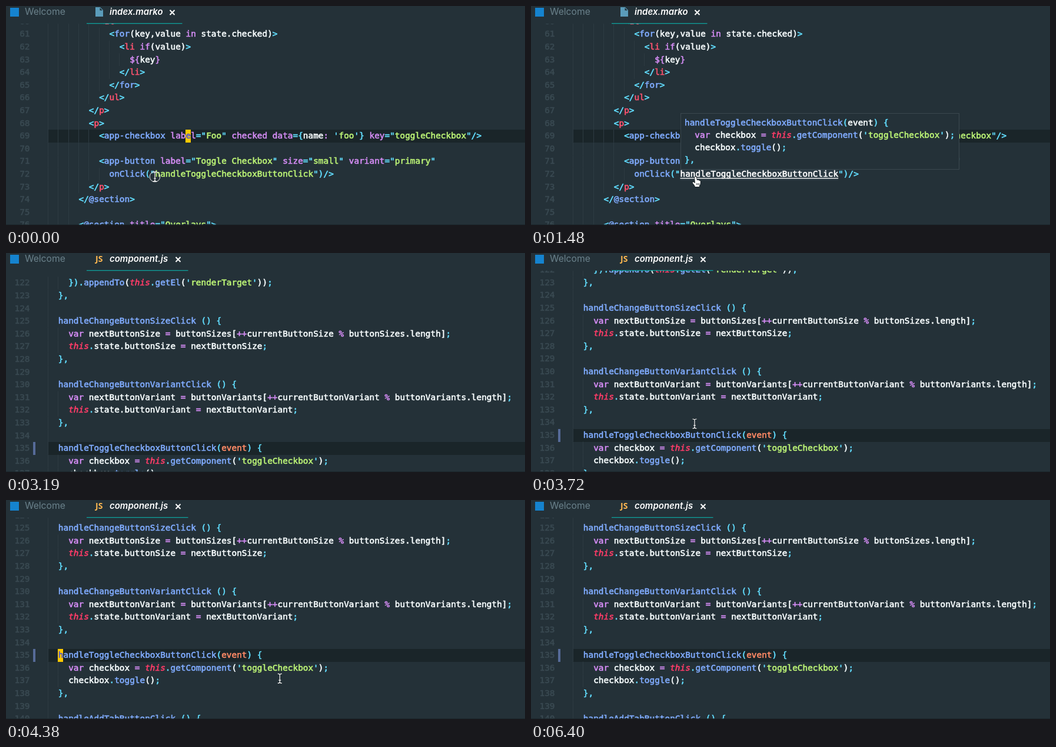
Write an HTML page with a canvas that moves like this. It is 882x372 px and loops after 6500 ms.

```html
<!DOCTYPE html>
<html lang="en">
<head>
<meta charset="utf-8">
<title>Go to definition</title>
<style>
html, body { margin: 0; width: 100%; height: 100%; overflow: hidden; background: #243138; }
canvas { display: block; }
</style>
</head>
<body>
<canvas id="stage" width="882" height="372"></canvas>
<script>
const ctx = document.getElementById('stage').getContext('2d');
const W = 882, H = 372, LOOP = 6500;
const CHAR = 8.667, LINE = 21.6, LEFT = 71.5, TOP = 30, BASE = 15.2;
const MONO = '14.4px "DejaVu Sans Mono", monospace';
const UI = 'Inter, sans-serif';
const BG = '#243138';

// A "~x" mark in a line switches to colour x.
const COLORS = {
  c: '#62deff', b: '#80acff', p: '#d48cf4', g: '#bcf476',
  r: '#ff5370', o: '#ff8a66', w: '#f8feff', t: '#ff3c68'
};

const TEMPLATE = { first: 60, rows: [
  '          ~c<~rul~c>',
  '            ~c<~bfor~w(key,value ~pin ~wstate.checked)~c>',
  '              ~c<~rli ~pif~w(value)~c>',
  '                ~p${~wkey~p}',
  '              ~c</~rli~c>',
  '            ~c</~bfor~c>',
  '          ~c</~rul~c>',
  '        ~c</~rp~c>',
  '        ~c<~rp~c>',
  '          ~c<~bapp-checkbox ~plabel~c="~gFoo~c" ~pchecked data~c={~wname~p: ~c\'~gfoo~c\'} ~pkey~c="~gtoggleCheckbox~c"/>',
  '          ',
  '          ~c<~bapp-button ~plabel~c="~gToggle Checkbox~c" ~psize~c="~gsmall~c" ~pvariant~c="~gprimary~c"',
  '            ~bonClick~c("~ghandleToggleCheckboxButtonClick~c")/>',
  '        ~c</~rp~c>',
  '      ~c</~b@section~c>',
  '      ',
  '      ~c<~b@section ~ptitle~c="~gOverlays~c">'
] };

const cycler = (name, list) => [
  '  ~bhandleChange' + name + 'Click ~c() {',
  `    ~pvar ~wnext${name} ~p= ~w${list}[~p++~wcurrent${name} ~p% ~w${list}.length]~c;`,
  `    ~tthis~c.~wstate.b${name.slice(1)} ~p= ~wnext${name}~c;`,
  '  ~c},',
  '  '
];

const COMPONENT = { first: 122, rows: [
  '    ~c}).~bappendTo~w(~tthis~c.~bgetEl~w(~c\'~grenderTarget~c\'~w))~c;',
  '  ~c},',
  '  ',
  ...cycler('ButtonSize', 'buttonSizes'),
  ...cycler('ButtonVariant', 'buttonVariants'),
  '  ~bhandleToggleCheckboxButtonClick~c(~oevent~c) {',
  '    ~pvar ~wcheckbox ~p= ~tthis~c.~bgetComponent~w(~c\'~gtoggleCheckbox~c\'~w)~c;',
  '    ~wcheckbox~c.~btoggle~w()~c;',
  '  ~c},',
  '  ',
  '  ~bhandleAddTabButtonClick ~c() {',
  '    '
] };

const HOVER = [
  '~bhandleToggleCheckboxButtonClick~c(~wevent~c) {',
  '  ~pvar ~wcheckbox ~p= ~tthis~c.~bgetComponent~w(~c\'~gtoggleCheckbox~c\'~w)~c;',
  '  ~wcheckbox~c.~btoggle~w()~c;',
  '~c},'
];

// Keys are [time, value, value...].
const SCROLL = [[3600, 321], [3720, 299], [4000, 268], [4270, 253]];
const APPROACH = [[0, 253, 290], [700, 273, 290], [1000, 280, 290]];
const WANDER = [
  [4300, 278, 290], [4380, 464, 303], [4580, 730, 332], [4760, 869, 352],
  [4970, 826, 305], [5200, 735, 242], [5420, 640, 290], [5630, 690, 338], [5910, 655, 384]
];

function along(keys, t) {
  if (t <= keys[0][0]) return keys[0].slice(1);
  for (let i = 1; i < keys.length; i++) {
    const a = keys[i - 1], b = keys[i];
    if (t < b[0]) {
      const k = (t - a[0]) / (b[0] - a[0]);
      return a.slice(1).map((v, j) => v + (b[j + 1] - v) * k);
    }
  }
  return keys[keys.length - 1].slice(1);
}

function box(x, y, w, h, color) {
  ctx.fillStyle = color;
  ctx.fillRect(x, y, w, h);
}

function glyphs(text, x, y, color, italic) {
  ctx.font = (italic ? 'italic ' : '') + MONO;
  ctx.fillStyle = ctx.strokeStyle = color;
  ctx.lineWidth = 0.6;
  for (const ch of text) {
    if (ch !== ' ') {
      ctx.fillText(ch, x, y);
      ctx.strokeText(ch, x, y);
    }
    x += CHAR;
  }
}

function code(line, x, y) {
  line.split('~').forEach((part, i) => {
    const key = i ? part[0] : 'w';
    const text = i ? part.slice(1) : part;
    glyphs(text, x, y, COLORS[key], key === 't');
    x += text.length * CHAR;
  });
}

function page(doc, number, top, lit) {
  const yOf = n => top + (n - number) * LINE;
  box(71, Math.round(yOf(lit)), W - 71, 22, '#1a2529');
  doc.rows.forEach((row, i) => {
    const n = doc.first + i, y = yOf(n);
    if (y > H || y + LINE < TOP) return;
    const indent = row.search(/[^ ]|$/);
    for (let c = 0; c < indent; c += 2) {
      box(Math.floor(LEFT + c * CHAR), y, 1, LINE, '#2d3b42');
    }
    const label = String(n), base = Math.round(y + BASE);
    glyphs(label, 40.5 - label.length * CHAR, base, '#394951');
    code(row, LEFT, base);
  });
}

function caret(col, y, ch) {
  const x = LEFT + col * CHAR;
  box(Math.floor(x), y, 9, 22, '#ffc900');
  glyphs(ch, x, Math.round(y + BASE), '#4a58d0');
}

function link(hovered) {
  const x = LEFT + 21 * CHAR, w = 31 * CHAR, y = 275;
  box(x, y, w, 21, hovered ? '#2b3a43' : BG);
  glyphs('handleToggleCheckboxButtonClick', x, Math.round(y + BASE), '#ffffff');
  box(x, y + 17, w, 1.3, '#ffffff');
}

function hover(alpha) {
  ctx.globalAlpha = alpha;
  box(254, 182, 474, 96, '#3b484f');
  box(255, 183, 472, 94, BG);
  HOVER.forEach((line, i) => code(line, 261, 203 + i * 21));
  ctx.globalAlpha = 1;
}

function tabs(name, icon, closeX) {
  box(0, 0, W, TOP, BG);
  box(7, 3, 15, 15, '#1583cf');
  ctx.font = '15.7px ' + UI;
  ctx.fillStyle = '#6a818b';
  ctx.fillText('Welcome', 32, 15);
  icon();
  ctx.font = 'italic 600 15px ' + UI;
  ctx.fillStyle = '#ffffff';
  ctx.fillText(name, 176, 15);
  ctx.strokeStyle = '#ffffff';
  ctx.lineWidth = 2;
  ctx.beginPath();
  for (const d of [-4, 4]) {
    ctx.moveTo(closeX - d, 7);
    ctx.lineTo(closeX + d, 15);
  }
  ctx.stroke();
  box(137, 29, closeX + 17 - 137, 1.3, '#0e9f9b');
}

function docIcon() {
  ctx.fillStyle = '#5b9cba';
  ctx.fill(new Path2D('M152 2h8l5 5v11h-13z'));
  ctx.fillStyle = BG;
  ctx.fill(new Path2D('M159.5 3v4.5h4.5z'));
}

function scriptIcon() {
  ctx.font = 'bold 14px "Open Sans", sans-serif';
  ctx.fillStyle = '#ffb951';
  ctx.fillText('JS', 152, 15);
}

function beam(x, y) {
  const path = new Path2D('M-3.5-8Q0-8 0-6V6Q0 8-3.5 8M3.5-8Q0-8 0-6M0 6Q0 8 3.5 8M-2 3H2');
  ctx.save();
  ctx.translate(x, y);
  for (const [width, color] of [[2.6, '#1a2429'], [1.2, '#ffffff']]) {
    ctx.lineWidth = width;
    ctx.strokeStyle = color;
    ctx.stroke(path);
  }
  ctx.restore();
}

function hand(x, y) {
  const path = new Path2D('M-2 1Q0-1 1 1L2 6Q3 5 4 6Q5 5 6 7Q8 6 8 9Q8 13 6 15V17H-1Q-2 14-5 11Q-6 9-4 9L-1 11Z');
  ctx.save();
  ctx.translate(x, y);
  ctx.lineJoin = 'round';
  ctx.lineWidth = 1.6;
  ctx.strokeStyle = '#11191d';
  ctx.stroke(path);
  ctx.fillStyle = '#ffffff';
  ctx.fill(path);
  ctx.lineWidth = 0.8;
  ctx.stroke(new Path2D('M1.5 11V14M3.5 11V14M5.5 11V14'));
  ctx.restore();
}

function ring(x, y, alpha) {
  ctx.globalAlpha = alpha;
  ctx.strokeStyle = '#ffffff';
  ctx.lineWidth = 1;
  ctx.beginPath();
  ctx.arc(x, y, 8.8, 0, Math.PI * 2);
  ctx.stroke();
  ctx.globalAlpha = 1;
}

function templateScene(t) {
  const linked = t >= 400, popup = t >= 1310 && t < 2700;
  page(TEMPLATE, 69, 210, t < 2700 ? 69 : 72);
  if (t < 510 || (t >= 1010 && t < 1480)) caret(27, 210, 'e');
  if (linked) link(popup);
  if (popup) hover(Math.min(1, (t - 1280) / 150));
  tabs('index.marko', docIcon, 282.5);
  const [x, y] = along(APPROACH, t);
  (linked ? hand : beam)(x, y);
  if (t < 120) ring(x, y, 0.9 * (1 - t / 120));
  if (t >= 2670 && t < 2700) ring(x, y, 0.9);
}

function componentScene(t) {
  const top = along(SCROLL, t)[0];
  page(COMPONENT, 135, top, 135);
  if (t >= 3190) box(46, Math.round(top), 4, 22, '#566b98');
  if ((t >= 4330 && t < 4400) || (t >= 4900 && t < 5400) || (t >= 5900 && t < 6400)) {
    caret(2, 253, 'h');
  }
  tabs('component.js', scriptIcon, 292.5);
  if (t >= 3340) beam(...along(WANDER, t));
}

function frame() {
  const t = performance.now() % LOOP;
  box(0, 0, W, H, BG);
  (t < 2870 ? templateScene : componentScene)(t);
  box(0, H - 1, W, 1, '#1c272c');
  requestAnimationFrame(frame);
}
frame();
</script>
</body>
</html>
```
